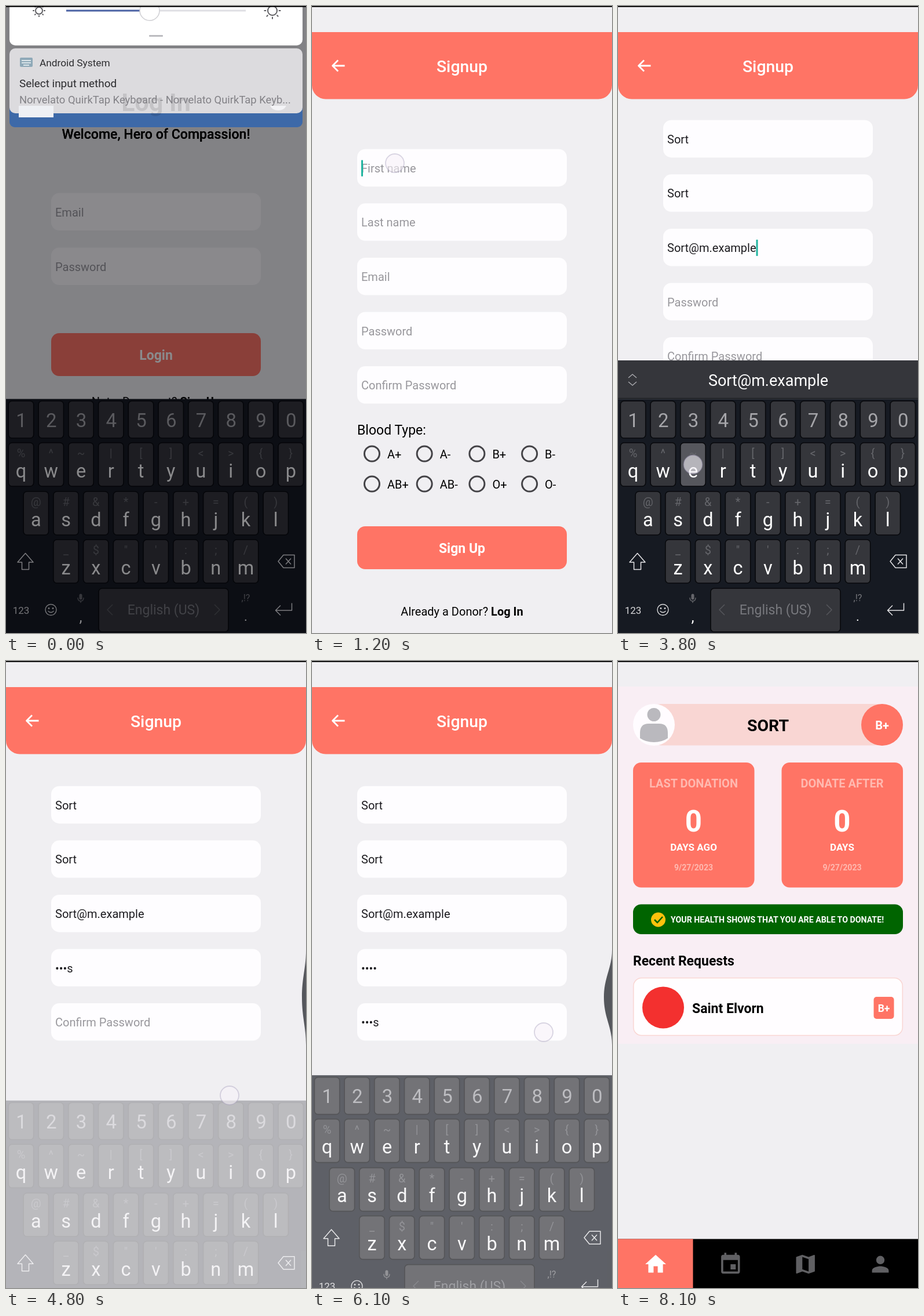
Write an HTML page that moves like this. It is 518 px wide and 1081 px high and loops after 8.2 s.

```html
<!DOCTYPE html>
<html lang="en">
<head>
<meta charset="utf-8">
<title>Donor signup</title>
<style>
html, body { margin: 0; width: 100%; height: 100%; overflow: hidden; background: #f0eff1; }
svg { display: block; width: 100%; height: 100%; font-family: Roboto, sans-serif; }
</style>
</head>
<body>
<svg id="stage" viewBox="0 0 518 1081"></svg>
<script>
const LOOP = 8200, STEP = 100;
const BG = '#f0eff2', CORAL = '#ff7465', INK = '#1c1b1f', HINT = '#98979c';
const stage = document.getElementById('stage');
const pen = document.createElement('canvas').getContext('2d');

const esc = s => s.replace(/&/g, '&amp;').replace(/</g, '&lt;');
const text = (x, y, s, size, fill, weight = 400, anchor = 'middle') =>
  `<text x="${x}" y="${y}" font-size="${size}" fill="${fill}" font-weight="${weight}" text-anchor="${anchor}" xml:space="preserve">${esc(s)}</text>`;
const rect = (x, y, w, h, fill, r = 0, more = '') =>
  `<rect x="${x}" y="${y}" width="${w}" height="${h}" rx="${r}" fill="${fill}" ${more}/>`;
const circle = (x, y, r, fill, more = '') => `<circle cx="${x}" cy="${y}" r="${r}" fill="${fill}" ${more}/>`;
const path = (d, fill, more = '') => `<path d="${d}" fill="${fill}" ${more}/>`;
const line = (d, color, w = 1.5) =>
  path(d, 'none', `stroke="${color}" stroke-width="${w}" stroke-linejoin="round"`);
const group = (s, y = 0, alpha = 1) => `<g transform="translate(0 ${y})" opacity="${alpha}">${s}</g>`;
const within = (t, a, b) => t >= a && t < b;

function curve(points, t) {
  const i = points.findIndex(p => p[0] > t);
  if (i < 0) return points[points.length - 1][1];
  if (!i) return points[0][1];
  const [t0, a] = points[i - 1], [t1, b] = points[i];
  return a + (b - a) * (t - t0) / (t1 - t0);
}

// Timeline
const HINTS = ['First name', 'Last name', 'Email', 'Password', 'Confirm Password'];
const TYPING = [
  { word: 'Sort', at: 1500, gap: 100 },
  { word: 'Sort', at: 2200, gap: 100 },
  { word: 'Sort@m.example', at: 2800, gap: 70 },
  { word: 'pass', at: 4000, gap: 200 },
  { word: 'pass', at: 5600, gap: 100 }
];
const FOCUS = [1200, 2000, 2700, 3900, 5300];
const KEYBOARD = [[0, 1], [300, 1], [600, 0], [1200, 0], [1500, 1], [4600, 1], [4700, .7], [4800, .27],
  [4900, 0], [5200, 0], [5300, .3], [5400, .755], [5500, 1], [6000, 1], [6300, 0]];
// start, end, from x, y, to x, y
const TOUCHES = [
  [300, 500, 512, 600, 400, 640], [700, 900, 335, 825, 335, 825],
  [1100, 1300, 143, 271, 143, 271], [1900, 2000, 125, 318, 125, 318], [2600, 2700, 118, 409, 118, 409],
  [3800, 3900, 130, 504, 130, 504], [4600, 4900, 514, 650, 386, 749], [5000, 5100, 262, 930, 262, 930],
  [5200, 5300, 140, 655, 140, 655], [6000, 6200, 514, 600, 400, 640], [6700, 6800, 285, 771, 285, 771],
  [7300, 7400, 262, 932, 262, 932]
];

const typed = (i, t) => {
  const { word, at, gap } = TYPING[i];
  return t < at ? 0 : Math.min(word.length, Math.floor((t - at) / gap) + 1);
};
const focusAt = t => FOCUS.filter(f => f <= t).length - 1;

// Keyboard
const ROWS = [
  { keys: '1234567890', x: 26, y: 681, h: 64 },
  { keys: 'qwertyuiop', marks: '%^~|[]<>{}', x: 26, y: 753, h: 75 },
  { keys: 'asdfghjkl', marks: '@#&*-+=()', x: 51.8, y: 837, h: 75 },
  { keys: 'zxcvbnm', marks: '_$"\':;/', x: 103.5, y: 920, h: 75 }
];
const PITCH = 51.75;

function keySpot(ch) {
  const c = ch === '@' ? 'a' : ch.toLowerCase();
  for (const r of ROWS) {
    const i = r.keys.indexOf(c);
    if (i >= 0) return [r.x + i * PITCH, r.y + r.h / 2, c];
  }
  return [414, 1040, c];
}

function pressed(t) {
  const i = focusAt(t);
  if (i < 0) return null;
  const n = typed(i, t);
  return n > typed(i, t - STEP) ? keySpot(TYPING[i].word[n - 1]) : null;
}

function suggestions(t) {
  const i = focusAt(t), n = typed(i, t), word = TYPING[i].word.slice(0, n);
  if (!n) return ['I', 'The', 'Hi'];
  if (i === 2) return ['', word, ''];
  return n < 4 ? ['So', word, 'Some'] : [word + 'ing', word, word + 'ed'];
}

function keyboard(t) {
  const focus = focusAt(t), strip = focus >= 0 && focus < 3, hit = pressed(t);
  const edge = 'stroke="#08090c" stroke-width="1.6"';
  let s = rect(0, 677.5, 518, 404, '#161a22');
  if (strip) {
    const [a, b, c] = suggestions(t);
    s += rect(0, 611, 518, 66, '#35363b') + rect(0, 676, 518, 1.5, '#0b0d11')
      + line('M18 641l7-6 7 6M18 648l7 6 7-6', '#a9a9ad')
      + text(112.5, 654, a, 27.5, '#a9a9ad')
      + text(259.5, 655, b, b.length > 5 ? 27 : 32.5, '#fff')
      + text(406, 654, c, 28, '#a9a9ad');
  }
  for (const { keys, marks, x, y, h } of ROWS) {
    [...keys].forEach((k, i) => {
      const cx = x + i * PITCH;
      s += rect(cx - 21.7, y, 43.4, h, hit && hit[2] === k ? '#56575d' : '#35363b', 6, edge);
      s += marks
        ? text(cx, y + 25, marks[i], 20, '#65666b') + text(cx, y + 59.5, k, 32.5, '#fff')
        : text(cx + .5, y + 44.5, k, 33, '#a5a5a9');
    });
  }
  const soft = '#d8d8da';
  s += rect(160, 1004, 224, 75, '#35363b', 6, edge) + text(272, 1049, 'English (US)', 23, '#77787d')
    + line('M184 1032l-9 9 9 9M360 1032l9 9-9 9', '#55565b')
    + text(26, 1047.5, '123', 17, soft)
    + circle(77.5, 1041, 9.5, 'none', `stroke="${soft}" stroke-width="1.4"`)
    + circle(74, 1038.5, 1.4, soft) + circle(81, 1038.5, 1.4, soft) + line('M72.5 1043q5 5 10 0', soft, 1.4)
    + rect(126.5, 1013.5, 5, 10, '#65666b', 2.5) + line('M124 1020q0 6 5 6t5-6M129 1026v3', '#65666b', 1.4)
    + text(129, 1062, ',', 26, '#fff') + text(414, 1026, ',!?', 16, '#77787d') + text(414, 1060, '.', 22, '#fff')
    + line('M33.5 943.5l13.5 15.5h-7.5v12.5h-12V959H20z', '#e4e4e6')
    + line('M470 957.5l9-11h19v22h-19zM483 952.5l9 10M492 952.5l-9 10', '#e4e4e6')
    + line('M493.5 1029.5v12.5H466M474 1033.5l-8.5 8.5 8.5 8.5', '#e4e4e6');
  return s;
}

// Screens
function field(y, hint, value = '', composing = false, cursor = false) {
  pen.font = '20px Roboto, sans-serif';
  const w = pen.measureText(value).width;
  return rect(78, y, 362, 64.5, '#fefdff', 14)
    + text(85, y + 40, value || hint, 20, value ? INK : HINT, 400, 'start')
    + (composing && value ? rect(85, y + 42, w, 1.5, INK) : '')
    + (cursor ? rect(85 + w, y + 19, 3, 28, '#20b5a0') : '');
}
const button = (y, label, alpha = 1) =>
  rect(78, y, 362, 74, CORAL, 14) + `<g opacity="${alpha}">${text(259, y + 46, label, 23, '#fff', 700)}</g>`;
const footer = (y, ask, link) =>
  `<text x="259" y="${y}" font-size="20" text-anchor="middle">${ask} <tspan font-weight="700">${link}</tspan></text>`;
const welcome = () => text(259, 229, 'Welcome, Hero of Compassion!', 23.1, '#000', 500);
const loginTitle = () => text(259, 181, 'Log In', 43, '#000', 700);

function login(t) {
  const s = loginTitle() + welcome()
    + field(322.5, 'Email') + field(416.5, 'Password')
    + button(564, 'Login') + footer(688.5, 'Not a Donor yet?', 'Sign Up');
  return rect(0, 0, 518, 1081, BG) + group(s, t < 500 ? 0 : 150);
}

function radios(on) {
  const types = ['A+', 'A-', 'B+', 'B-', 'AB+', 'AB-', 'O+', 'O-'];
  return types.map((type, i) => {
    const x = 103.5 + i % 4 * 90.7, y = i < 4 ? 772 : 824, hot = on && i === 2;
    return circle(x, y, 13, 'none', `stroke="${hot ? '#5f5795' : '#444347'}" stroke-width="3"`)
      + (hot ? circle(x, y, 7.5, '#635e9e') : '')
      + text(x + 26.5, y + 8, type, 20, '#000', 400, 'start');
  }).join('');
}

function signup(t) {
  const focus = focusAt(t), error = within(t, 5100, 5600);
  const compact = within(t, 1300, 4900) || within(t, 5400, 6200);
  const lift = (compact ? (focus < 3 ? 50 : 31) : 0) + (error ? 10 : 0);
  let last = FOCUS[focus];
  if (focus >= 0) {
    const { at, gap } = TYPING[focus], n = typed(focus, t);
    if (n) last = at + (n - 1) * gap;
  }
  const blink = (t - last) % 400 < 200;
  let form = '';
  HINTS.forEach((hint, i) => {
    const n = typed(i, t);
    let value = TYPING[i].word.slice(0, n);
    if (i > 2 && n) {
      const shown = i === focus && t < TYPING[i].at + 3 * TYPING[i].gap + 300;
      value = '•'.repeat(shown ? n - 1 : n) + (shown ? value[n - 1] : '');
    }
    form += field(246.7 + i * 93.6, hint, value, i === focus && i < 2, i === focus && blink);
  });
  if (error) form += text(259, 715, 'Please confirm your password', 20, '#d0180c');
  let s = rect(0, 0, 518, 1081, BG) + group(form, -lift);
  if (!compact) {
    const press = within(t, 7200, 7500) ? .85 : 1;
    s += group(text(78, 739, 'Blood Type:', 23, '#000', 400, 'start') + radios(t >= 6800)
      + button(897, 'Sign Up', press), error ? 10 : 0)
      + footer(1051, 'Already a Donor?', 'Log In');
  }
  if (within(t, 1300, 1500)) s += rect(0, 611, 518, 470, '#fff');
  if (within(t, 5400, 5500)) s += rect(0, 677, 518, 404, '#fff');
  return s + path('M0 45H518V137a23.5 23.5 0 0 1-23.5 23.5H23.5A23.5 23.5 0 0 1 0 137z', CORAL)
    + line('M56.5 103H36M45 93.5L35.5 103l9.5 9.5', '#fff', 2.8)
    + text(259, 114, 'Signup', 28.4, '#fff', 500);
}

function card(x, title, unit) {
  const c = x + 104.5, pale = '#ffb9b0';
  return rect(x, 175, 209.5, 215.5, CORAL, 14) + text(c, 218, title, 20, pale, 700)
    + text(c, 293.5, '0', 51, '#fff', 700) + text(c, 326.5, unit, 17, '#fff', 700)
    + text(c, 361, '9/27/2023', 14.1, pale, 700);
}
const icon = (x, y, d, fill) =>
  `<path transform="translate(${x - 21.6} ${y - 21.6}) scale(1.8)" d="${d}" fill="${fill}" fill-rule="evenodd"/>`;

function home() {
  const gray = '#606063';
  return rect(0, 0, 518, 1081, BG) + rect(0, 44, 518, 616, '#f9eef4')
    + rect(40, 74, 440, 71.5, '#f9d6d3', 35) + circle(62, 110, 36, '#fffcff')
    + circle(62, 92.5, 11.5, '#bab9be')
    + path('M38 133V124q0-16 15-16h18q15 0 15 16v9q-10 7-24 7t-24-7z', '#bab9be')
    + text(259, 121, 'SORT', 28.4, '#000', 700)
    + circle(456, 110, 36, CORAL) + text(456, 117.5, 'B+', 20, '#fff', 700)
    + card(26, 'LAST DONATION', 'DAYS AGO') + card(282.5, 'DONATE AFTER', 'DAYS')
    + rect(26, 419.5, 466, 51.5, '#006400', 14) + circle(69.5, 446, 12.5, '#fdc20c')
    + line('M63 446l5 5 9-10', '#006400', 2.6)
    + text(91, 451, 'YOUR HEALTH SHOWS THAT YOU ARE ABLE TO DONATE!', 14.2, '#fff', 700, 'start')
    + text(26, 525, 'Recent Requests', 23, '#000', 700, 'start')
    + rect(26.7, 546.5, 464.6, 99, '#fffdff', 14, 'stroke="#f9d6d3" stroke-width="1.5"')
    + circle(78, 597.5, 36, '#f3302f') + text(128, 607, 'Saint Elvorn', 23, '#000', 700, 'start')
    + rect(441.5, 579, 35, 38, CORAL, 5) + text(459, 605, 'B+', 17.5, '#fff', 700)
    + rect(0, 996.5, 518, 85, '#000') + rect(0, 996.5, 129.5, 85, CORAL)
    + icon(65, 1040, 'M10 20v-6h4v6h5v-8h3L12 3 2 12h3v8z', '#fff')
    + icon(194.3, 1040, 'M17 12h-5v5h5zM16 1v2H8V1H6v2H5a2 2 0 0 0-2 2v14a2 2 0 0 0 2 2h14a2 2 0 0 0 2-2V5a2 2 0 0 0-2-2h-1V1zM19 19H5V8h14z', gray)
    + icon(323.7, 1040, 'M20.5 3L15 5.1 9 3 3.4 4.9 3 5.4V20.5l.5.5L9 18.9l6 2.1 5.6-1.9.4-.5V3.5zM15 19l-6-2.1V5l6 2.1z', gray)
    + icon(453, 1040, 'M12 12a4 4 0 1 0 0-8 4 4 0 0 0 0 8zM12 14c-2.7 0-8 1.3-8 4v2h16v-2c0-2.7-5.3-4-8-4z', gray);
}

function sun(x, r) {
  let d = '';
  for (let i = 0; i < 8; i++) {
    const a = i * Math.PI / 4, c = Math.cos(a), s = Math.sin(a);
    d += `M${x + c * r * 1.35} ${8 + s * r * 1.35}L${x + c * r * 1.8} ${8 + s * r * 1.8}`;
  }
  return circle(x, 8, r, 'none', 'stroke="#5d5d61" stroke-width="2"') + line(d, '#5d5d61', 2);
}

function shade() {
  const maker = 'Norvelato QuirkTap Keyb';
  return rect(6, 150, 506, 59, '#3d69a8', 9)
    + rect(6, 73, 506, 112, '#dcdbde', 10)
    + rect(22, 172, 60, 20, '#eef0f4') + path('M456 172h28q-4 8-14 8t-14-8z', '#f3f3f6')
    + group(loginTitle(), 0, .1)
    + path('M6 0H512V58a10 10 0 0 1-10 10H16a10 10 0 0 1-10-10z', '#fff')
    + sun(57, 6) + sun(460, 8)
    + rect(104, 6.5, 310, 3, '#dfdfe3') + rect(104, 6.5, 144, 3, '#4c64a6')
    + circle(248, 8, 17, '#fff', 'stroke="#d0d0d4" stroke-width="1.5"')
    + rect(247, 50, 24, 3, '#bcbcc0', 1)
    + rect(24, 89, 22, 16, '#8fa9b8', 2) + line('M27 94h16M27 98h16M30 102h10', '#dce6ea', 1.8)
    + text(58, 103.5, 'Android System', 17.3, '#2e2e31', 400, 'start')
    + text(23, 140, 'Select input method', 18.9, '#2b2b2e', 400, 'start')
    + text(23, 168, `${maker}oard - ${maker}...`, 18.4, '#828186', 400, 'start');
}

function touch(t) {
  const dot = (x, y) => circle(x, y, 16, '#f6f2f9', 'fill-opacity=".6" stroke="#a49cba" stroke-opacity=".4" stroke-width="1.8"');
  const hit = pressed(t);
  if (hit) return dot(hit[0], hit[1]);
  const p = TOUCHES.find(([a, b]) => within(t, a, b));
  if (!p) return '';
  const [a, b, x0, y0, x1, y1] = p, k = Math.min(1, (t - a) / Math.max(STEP, b - a - STEP));
  return dot(x0 + (x1 - x0) * k, y0 + (y1 - y0) * k);
}

function backEdge(t) {
  const age = [400, 4700, 6100].map(a => t - a).find(d => within(d, 0, 200));
  if (age === undefined) return '';
  const x = 518 - (age < 100 ? 14 : 7);
  return path(`M518 498C518 530 ${x} 545 ${x} 580S518 630 518 662z`, '#55575c');
}

function draw(t) {
  const enter = (screen, at) => {
    const k = Math.min(1, (t - at + STEP) / 300);
    return group(screen, 60 * (1 - k) ** 2, k);
  };
  let s = '';
  if (t < 1100) s += login(t);
  if (within(t, 900, 7900)) s += enter(signup(t), 900);
  if (t >= 7600) s += enter(home(), 7600);
  const k = curve(KEYBOARD, t);
  if (k > 0) s += group(keyboard(t), 110 * (1 - k), k);
  s += backEdge(t);
  if (t < 300) {
    s += rect(0, 0, 518, 1081, '#000006', 0, `opacity="${.46 * (1 - t / 300)}"`)
      + group(welcome(), 0, Math.max(0, 1 - t / 200))
      + group(shade(), -t * 1.1);
  }
  stage.innerHTML = s + touch(t) + rect(0, 0, 518, 1.8, '#000');
}

let shown = -1;
const start = performance.now();
function tick() {
  const t = Math.floor((performance.now() - start) % LOOP / STEP) * STEP;
  if (t !== shown) draw(shown = t);
  requestAnimationFrame(tick);
}
draw(0);
tick();
</script>
</body>
</html>
```
